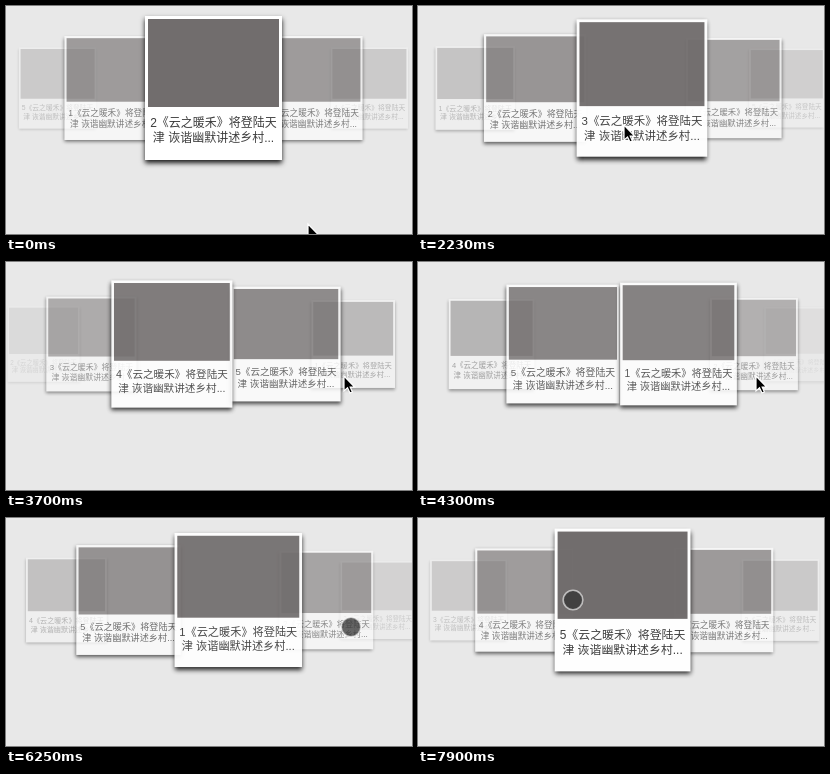
An HTML page that plays this animation: 406x228 px, repeating every 8 s.

```html
<!DOCTYPE html>
<html lang="zh-CN">
<head>
<meta charset="utf-8">
<style>
html, body { margin: 0; width: 100%; height: 100%; overflow: hidden; background: #e8e8e8; }
#stage { position: relative; width: 406px; height: 228px; overflow: hidden; }
.card {
  position: absolute; left: 139px; top: 10px; width: 137px; height: 144px;
  background: #fff; box-shadow: 0 3px 5px rgba(0, 0, 0, .9);
  font: 12px/15px "Liberation Sans", "Noto Sans CJK SC", "Noto Sans CJK", sans-serif;
  color: #3c3c3c; text-align: center; white-space: nowrap;
}
.photo { position: absolute; left: 3px; top: 3px; width: 131px; height: 88px; background: #716d6d; }
.title { position: absolute; left: 0; top: 100px; width: 100%; }
#pointer { position: absolute; left: 0; top: 0; z-index: 1000; overflow: visible; }
</style>
</head>
<body>
<div id="stage">
  <svg id="pointer" width="1" height="1">
    <path id="arrow" d="M0 1V16L3.5 12.8L6 18L8.4 17L6.2 12H10.6Z" fill="#000" stroke="#fff" stroke-width="1.2"/>
    <circle id="touch" r="9.8" fill="#333" fill-opacity=".75" stroke="#fff" stroke-opacity=".6" stroke-width="1.6"/>
  </svg>
</div>
<script>
const LOOP = 8000, STEP = 148.7, COUNT = 5, SPACING = 138, TOUCH_START = 37;

const $ = id => document.getElementById(id);
const ramp = (t, from, to) => Math.min(1, Math.max(0, (t - from) / (to - from)));
const easeOut = k => 1 - (1 - k) ** 2.15;

// Two single page turns, a fling over two pages, then a slow turn back.
const pageAt = t => 2 + ramp(t, 8, 16) + ramp(t, 16, 23)
  + 2 * easeOut(ramp(t, 23, 35)) - ramp(t, 39.3, 53.3);

const pointerAt = t => [
  302 - 26 * ramp(t, 0, 3) - 160 * ramp(t, 5, 7) + 90 * ramp(t, 8, 15)
    + 132 * ramp(t, 15, 21) - 308 * ramp(t, 29, 35) + 315 * ramp(t, 36, 39) - 190 * ramp(t, 49, 53),
  217 - 93 * ramp(t, 0, 3) - 11 * ramp(t, 8, 21)
    - 28 * ramp(t, 29, 35) + 24 * ramp(t, 36, 39) - 27 * ramp(t, 49, 53)
];

const cards = Array.from({ length: COUNT }, (_, i) => {
  const card = document.createElement('div');
  card.className = 'card';
  card.innerHTML = `<div class="photo"></div><div class="title">${i + 1}《云之暖禾》将登陆天<br>津 诙谐幽默讲述乡村...</div>`;
  $('stage').append(card);
  return card;
});

// Cards stand on a ring and recede in perspective away from the centre.
function placeCard(card, index, page) {
  let offset = index + 1 - page;
  offset -= COUNT * Math.round(offset / COUNT);
  const distance = Math.abs(offset);
  const scale = 1 / (1 + .385 * distance);
  card.style.transform = `translateX(${SPACING * offset * scale}px) scale(${scale})`;
  card.style.opacity = Math.max(0, 1 - .38 * distance);
  card.style.zIndex = Math.round(500 - 100 * distance);
}

function draw(now) {
  const step = Math.floor((now % LOOP + 14) / STEP);
  const page = pageAt(step);
  cards.forEach((card, i) => placeCard(card, i, page));
  const [x, y] = pointerAt(step);
  const touching = step >= TOUCH_START;
  $('pointer').style.transform = `translate(${x}px, ${y}px)`;
  $('arrow').style.display = touching ? 'none' : '';
  $('touch').style.display = touching ? '' : 'none';
}

const start = performance.now();
function tick() {
  draw(performance.now() - start);
  requestAnimationFrame(tick);
}
tick();
</script>
</body>
</html>
```
